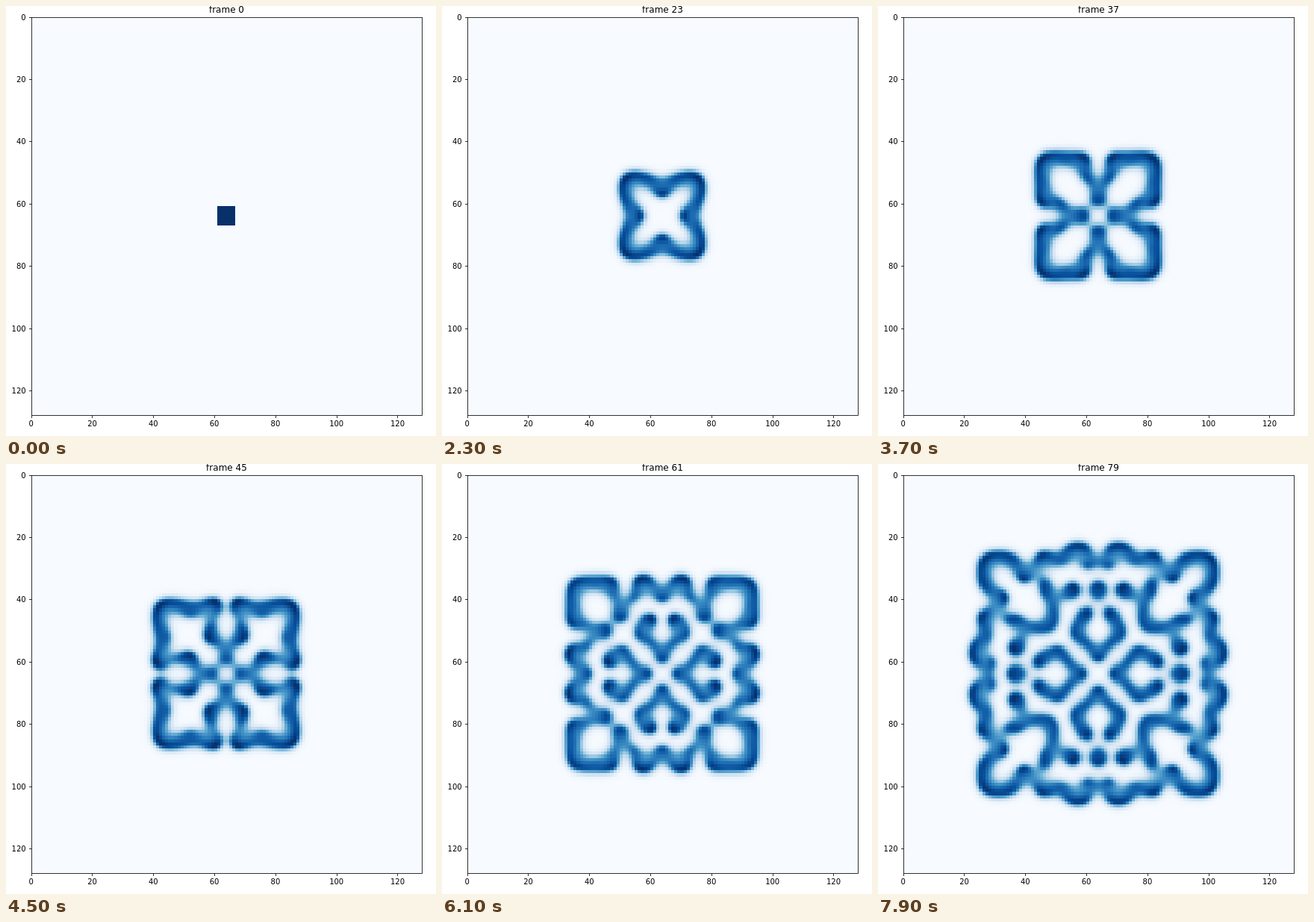
Animation, 576 px wide and 576 px high, one loop 8 s. Source, as an HTML page with a canvas:

```html
<!DOCTYPE html>
<html>
<head>
<meta charset="utf-8">
<style>
html, body { margin: 0; width: 100%; height: 100%; overflow: hidden; background: #fff; }
canvas { display: block; }
</style>
</head>
<body>
<canvas id="stage" width="576" height="576"></canvas>
<script>
// Gray-Scott reaction-diffusion; by symmetry only one quadrant is computed.
const HALF = 64, W = HALF + 1;
const F = 0.04, K = 0.06075, DU = 0.1, DV = 0.05, DT = 0.2;
const STEPS = 200, FRAMES = 80, FRAME_MS = 100;
const LEFT = 33.7, RIGHT = 557.2, TOP = 14.8, BOTTOM = 548.2;

const ctx = document.getElementById('stage').getContext('2d');
const grid = () => new Float64Array(W * W);
let u = grid(), v = grid(), u2 = grid(), v2 = grid();

function seed(a, size, value) {
  for (let y = 1; y <= size; y++) a.fill(value, y * W + 1, y * W + 1 + size);
}
seed(u, 6, 0.9);
seed(v, 3, 0.7);

// Row and column 0 mirror their inner neighbours.
function mirror(a) {
  for (let i = 1; i < W; i++) {
    a[i] = a[W + i];
    a[i * W] = a[i * W + 1];
  }
}

function step() {
  mirror(u);
  mirror(v);
  for (let y = 1; y < HALF; y++) {
    for (let i = y * W + 1, end = y * W + HALF; i < end; i++) {
      const a = u[i], b = v[i], r = a * b * b;
      const lu = u[i - 1] + u[i + 1] + u[i - W] + u[i + W] - 4 * a;
      const lv = v[i - 1] + v[i + 1] + v[i - W] + v[i + W] - 4 * b;
      u2[i] = a + DT * (DU * lu - r + F * (1 - a));
      v2[i] = b + DT * (DV * lv + r - (F + K) * b);
    }
  }
  [u, u2] = [u2, u];
  [v, v2] = [v2, v];
}

const states = [v.slice()];
function stateAt(n) {
  while (states.length <= n) {
    for (let s = 0; s < STEPS; s++) step();
    states.push(v.slice());
  }
  return states[n];
}

// Blue colour scale, light to dark
const stops = [0xf7fbff, 0xdeebf7, 0xc6dbef, 0x9ecae1, 0x6baed6, 0x4292c6, 0x2171b5, 0x08519c, 0x08306b];
const palette = Array.from({ length: 256 }, (_, i) => {
  const p = i / 255 * 8, k = Math.min(7, Math.floor(p));
  const mix = shift => {
    const a = stops[k] >> shift & 255, b = stops[k + 1] >> shift & 255;
    return Math.round(a + (b - a) * (p - k));
  };
  return `rgb(${mix(16)},${mix(8)},${mix(0)})`;
});

const xAt = n => LEFT + n * (RIGHT - LEFT) / 128;
const yAt = n => TOP + n * (BOTTOM - TOP) / 128;
const snap = p => Math.round(p) + 0.5;

function cell(x, y) {
  const x0 = Math.floor(xAt(x)), y0 = Math.floor(yAt(y));
  ctx.fillRect(x0, y0, Math.floor(xAt(x + 1)) - x0, Math.floor(yAt(y + 1)) - y0);
}

function drawField(state) {
  ctx.fillStyle = palette[0];
  ctx.fillRect(34, 15, 523, 533);
  let max = 0;
  for (let y = 1; y < W; y++)
    for (let x = 1; x < W; x++) max = Math.max(max, state[y * W + x]);
  for (let y = 0; y < HALF; y++) {
    for (let x = 0; x < HALF; x++) {
      const shade = Math.min(255, Math.floor(state[(y + 1) * W + x + 1] / max * 256));
      if (shade < 1) continue;
      ctx.fillStyle = palette[shade];
      for (const cx of [HALF + x, HALF - 1 - x])
        for (const cy of [HALF + y, HALF - 1 - y]) cell(cx, cy);
    }
  }
}

function drawAxes() {
  const left = snap(LEFT), top = snap(TOP), bottom = snap(BOTTOM);
  ctx.strokeStyle = ctx.fillStyle = '#000';
  ctx.lineWidth = 0.8;
  ctx.strokeRect(left, top, snap(RIGHT) - left, bottom - top);
  ctx.font = '10px "DejaVu Sans", sans-serif';
  ctx.beginPath();
  for (let n = 0; n <= 120; n += 20) {
    const x = snap(xAt(n)), y = snap(yAt(n));
    ctx.moveTo(x, bottom);
    ctx.lineTo(x, bottom + 3.5);
    ctx.moveTo(left, y);
    ctx.lineTo(left - 3.5, y);
    ctx.textAlign = 'center';
    ctx.fillText(n, xAt(n), 563);
    ctx.textAlign = 'right';
    ctx.fillText(n, LEFT - 7, y + 3.5);
  }
  ctx.stroke();
}

function draw(n) {
  ctx.fillStyle = '#fff';
  ctx.fillRect(0, 0, 576, 576);
  drawField(stateAt(n));
  drawAxes();
  ctx.font = '12px "DejaVu Sans", sans-serif';
  ctx.textAlign = 'center';
  ctx.fillText('frame ' + n, (LEFT + RIGHT) / 2, 9);
}

let shown = -1;
function tick() {
  const n = Math.floor(performance.now() / FRAME_MS) % FRAMES;
  if (n !== shown) draw(shown = n);
  requestAnimationFrame(tick);
}
tick();
</script>
</body>
</html>
```
